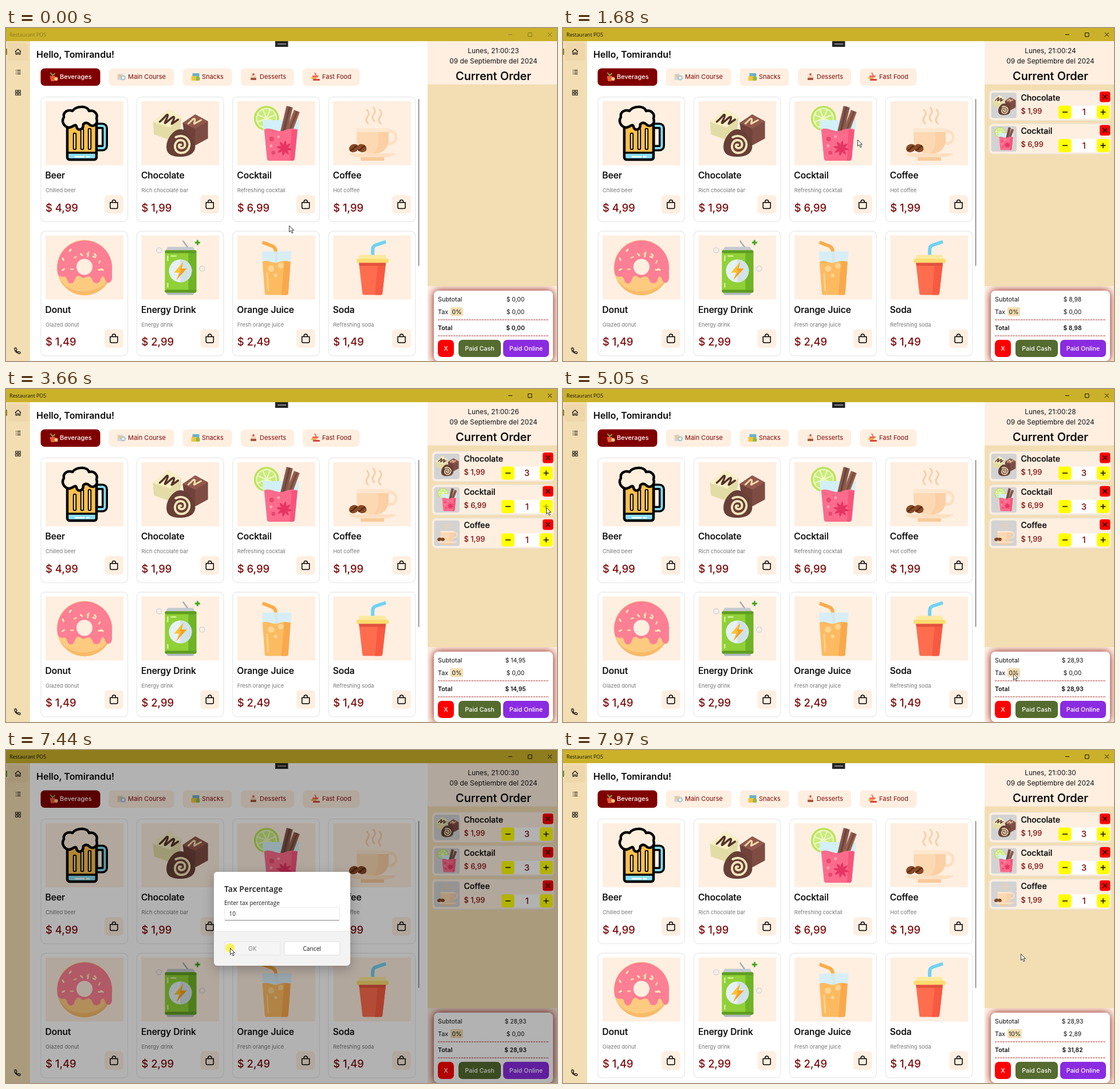
An HTML page for the animation above (8000 ms loop, 962 by 582 pixels).

```html
<!DOCTYPE html>
<html lang="en">
<head>
<meta charset="utf-8">
<title>Restaurant POS</title>
<style>
html, body { margin: 0; width: 100%; height: 100%; overflow: hidden; background: #fff; }
svg { display: block; width: 962px; height: 582px; }
text { font-family: Inter, Roboto, sans-serif; white-space: pre; }
.ui { font-family: "Open Sans", "Noto Sans", sans-serif; }
#dialog { filter: drop-shadow(0 6px 10px rgba(0,0,0,.24)); }
#bill { filter: drop-shadow(0 0 7px rgba(128,0,0,.95)); }
</style>
</head>
<body>
<script>
const CREAM = '#ffefe1', WHEAT = '#f3deb3', MAROON = '#7d0a0a', LOOP = 8000;

// Markup helpers
const rect = (x, y, w, h, fill, r = 0, more = '') =>
  `<rect x="${x}" y="${y}" width="${w}" height="${h}" rx="${r}" fill="${fill}" ${more}/>`;
const path = (d, fill = 'none', stroke = 'none', w = 1, more = '') =>
  `<path d="${d}" fill="${fill}" stroke="${stroke}" stroke-width="${w}" ${more}/>`;
const dot = (x, y, r, fill, stroke = 'none', w = 1, more = '') =>
  `<circle cx="${x}" cy="${y}" r="${r}" fill="${fill}" stroke="${stroke}" stroke-width="${w}" ${more}/>`;
const text = (s, x, y, size, weight = 400, fill = '#111', more = '') =>
  `<text x="${x}" y="${y}" font-size="${size}" font-weight="${weight}" fill="${fill}" ${more}>${s}</text>`;
const group = (x, y, body, scale = 1, more = '') =>
  `<g transform="translate(${x} ${y}) scale(${scale})" ${more}>${body}</g>`;
const MID = 'text-anchor="middle"', ROUND = 'stroke-linecap="round" stroke-linejoin="round"', UI = 'class="ui"';
const times = (n, f) => Array.from({ length: n }, (_, i) => f(i)).join('');
const money = c => `$ ${Math.floor(c / 100)},${String(c % 100).padStart(2, '0')}`;

// Pictures, each centred on 0,0 and about 98 units tall
const art = {
  Beer: () =>
    rect(18, -13, 17.5, 39, 'none', 4, 'stroke="#000" stroke-width="11"') +
    rect(18, -13, 17.5, 39, 'none', 4, 'stroke="#84dcf3" stroke-width="4"') +
    rect(-30, -26, 51, 72, '#fdc04d', 4) + rect(-28, 35, 47, 10, '#8be0f5') +
    rect(-30, -26, 51, 72, 'none', 4, 'stroke="#000" stroke-width="4.5"') +
    path('M-28 34H19', 'none', '#000', 3.5) +
    path('M-16 41H-1M4 41H8', 'none', '#fff', 2.5, ROUND) +
    times(3, i => path(`M${-17 + i * 13} ${i ? -6 : 2}V26`, 'none', '#000', 6.5, ROUND) +
      path(`M${-17 + i * 13} ${i ? -6 : 2}V26`, 'none', '#fde3a0', 2.5, ROUND)) +
    path('M-28-10C-36-12-41-21-36-28C-38-38-28-42-21-39C-15-48 5-49 8-39C17-41 24-34 21-26C25-16 14-9 8-16C4-20 0-18-2-16C-2-4-13-4-14-12C-16-18-20-10-28-10Z',
      '#ffefdc', '#000', 4.5, ROUND),

  Chocolate: () =>
    path('M-48-20L-20-42L2-28L0-6L-18 12L-46 2Z', '#e3dca6') +
    path('M-48-20L-20-42L2-28L-18-10Z', '#f7f0c4') +
    path('M4-18L26-33L48-21V9L26 21L8 10Z', '#70423a') +
    path('M26-8L48-21V9L26 21Z', '#7e4c43') + path('M4-18L26-33L48-21L26-8Z', '#93584c') +
    path('M-36-20C-26-28-24-34-22-32S-30-16-26-18S-12-32-11-28S-18-14-14-17L-4-24', 'none', '#54302a', 3.5, ROUND) +
    path('M14-17C20-22 23-27 25-25S22-15 25-17L36-23', 'none', '#f3dfa9', 3, ROUND) +
    path('M-24 20C-22 6-10-8 1-7C13-6 26 10 26 24C25 36 14 41 0 41C-16 41-26 36-24 20Z', '#673f36') +
    path('M1 20C-4 18-4 26 2 26C10 26 11 13 1 12C-11 11-14 31-1 34C14 36 20 20 13 11C8 4-2 3-8 7', 'none', '#f5e6bb', 4, ROUND),

  Cocktail: () =>
    dot(-17, -26, 22, '#b9e457') + dot(-17, -26, 18.5, '#eef8c8') +
    times(8, i => path('M0-3L5-15Q0-18-5-15Z', '#c8ec78', 'none', 1, `transform="translate(-17 -26) rotate(${i * 45})"`)) +
    path('M-24-23H40L33 48H-17Z', '#d2f0f7') +
    path('M18-48L29-45L17 4L6 2Z', '#87584c') + path('M22-47L25-46L13 3L10 3Z', '#6c4239') +
    path('M31-41L41-37L25 6L14 4Z', '#96604f') + path('M35-39L38-38L21 5L18 5Z', '#754a3e') +
    path('M-21-7C-8-12 2 0 14-5S32-8 37-7L32 45Q31 48 28 48H-12Q-15 48-16 45Z', '#fc6b8b') +
    path('M27-6H37L32 45Q31 48 28 48H24Z', '#f95379') +
    times(8, i => path('M0 0Q-5-6 0-14Q5-6 0 0', '#e63463', 'none', 1, `transform="translate(14 26) rotate(${i * 45 + 10})"`)) +
    dot(-8, 10, 4, '#e8476f') + dot(-5, 34, 3.5, '#e8476f') + dot(4, 6, 2.5, '#ffa4b6') + dot(-9, 22, 2.5, '#ffa4b6'),

  Coffee: () =>
    times(3, i => path(`M${-7 + i * 11} ${i == 1 ? -21 : -17}q-6-6-1-12t-1-12`, 'none', '#f8cfa8', 3, ROUND)) +
    dot(31, 7, 11, 'none', '#fde0c2', 5) +
    path('M-27-9H29V10C29 26 18 35 8 35H-6C-18 35-27 24-27 10Z', '#fcd9b3') +
    path('M10-9H29V10C29 26 18 35 8 35H2C12 28 12 12 10-9Z', '#fbd0a4') +
    path('M-27-9H29V-2H-27Z', '#fee7cf') +
    path('M-42 35H43C38 40 30 42 20 42H-20C-30 42-38 40-42 35Z', '#fde0c3') + rect(-20, 42, 41, 6, '#f7cb9a', 1) +
    [[-32, 26, -25], [-18, 26, 15]].map(([x, y, a]) =>
      group(x, y, `<ellipse rx="8.5" ry="7" fill="#8a4b26" transform="rotate(${a})"/>` +
        path('M-6 4Q-1 2 0 0T6-4', 'none', '#4c2612', 2))).join(''),

  Donut: () =>
    dot(0, 0, 48, '#fdcb80') + path('M-47 10A48 48 0 0 0 48 4C43 50-36 56-47 10Z', '#f8bb68') +
    path('M-47 9A48 48 0 1 1 48 6V20C46 29 38 29 36 21C34 13 29 15 28 22C26 30 15 29 14 22C10 13 4 16 0 18C-6 20-8 11-14 16C-18 20-17 28-24 28C-32 27-28 16-36 16C-42 17-46 15-47 9Z', '#fd7f93') +
    dot(0, -1, 14, CREAM) +
    times(20, i => {
      const a = i * 2.42 + 3, r = 22 + (i * 7) % 19, x = Math.cos(a) * r, y = Math.sin(a) * r;
      return y > 10 ? '' : path('M-2 0H2', 'none', i % 3 ? '#fff0bd' : '#fbd5a8', 2.6,
        `${ROUND} transform="translate(${x.toFixed(1)} ${y.toFixed(1)}) rotate(${i * 53})"`);
    }),

  'Energy Drink': () =>
    path('M5-46L13-35', 'none', '#a5acb4', 2.5, ROUND) +
    path('M-22-36H22L27-27H-27Z', '#c3cad0') + path('M-22 48H22L27 41H-27Z', '#aeb7bd') +
    rect(-27, -30, 55, 74, '#8fd136', 3) + rect(14, -30, 14, 74, '#6fb426', 3) +
    rect(-27, -30, 55, 5, '#5e9d22', 2) + rect(-27, 39, 55, 5, '#5e9d22', 2) +
    path('M-22-20V-12M-22 28V34M-16-20H-8', 'none', '#d5f39a', 2.5, ROUND) +
    dot(0, 6, 20, '#e6f1f5') + path('M0-14A20 20 0 0 1 0 26Z', '#d3e2e8') +
    path('M5-10L-11 9H-2L-7 22L11 2H2Z', '#fcc32f') + path('M5-10L-1 5H2L-7 22L11 2H2Z', '#f79f23') +
    path('M30-48V-39M25.5-43.5H34.5', 'none', '#41a51c', 2.8) +
    dot(-37, -30, 4.5, 'none', '#d8dcdf', 2) + dot(38, 2, 4.5, 'none', '#d8dcdf', 2),

  'Orange Juice': () =>
    path('M-24-44L-6-37Q-2-35-1-30L2-4', 'none', '#fbac48', 6, 'stroke-linejoin="round"') +
    path('M-25-28H27L21 45Q21 48 18 48H-17Q-20 48-20 45Z', '#d4effa', 'none', 1, 'opacity=".9"') +
    path('M-24-10C-14-15-6-5 4-9S20-11 25-10L21 45Q21 48 18 48H-17Q-20 48-20 45Z', '#fdbb61') +
    path('M14-11L25-10L21 45Q21 48 18 48H9Z', '#f9a94d') +
    dot(-9, 2, 5.5, '#ffd591') + dot(8, -3, 5, '#ffd591') + dot(-1, 14, 3, '#ffd591') +
    path('M-16 10L-14 40', 'none', '#ffd591', 2.5, ROUND),

  Soda: () =>
    path('M1-20V-31Q1-37 6-39L24-45', 'none', '#6fd2f3', 6, 'stroke-linejoin="round"') +
    path('M-23-8H24L18 45Q18 48 15 48H-14Q-17 48-17 45Z', '#ff6d4f') +
    path('M10-8H24L18 45Q18 48 15 48H5Z', '#f85a41') +
    path('M-22-22H23L26-12H-25Z', '#fdeaa0') + rect(-27, -15, 56, 7, '#fcdc6f', 2) + path('M-23-8H24L23-3H-22Z', '#e3513c')
};

const products = [
  ['Beer', 'Chilled beer', 499], ['Chocolate', 'Rich chocolate bar', 199],
  ['Cocktail', 'Refreshing cocktail', 699], ['Coffee', 'Hot coffee', 199],
  ['Donut', 'Glazed donut', 149], ['Energy Drink', 'Energy drink', 299],
  ['Orange Juice', 'Fresh orange juice', 249], ['Soda', 'Refreshing soda', 149]
];

const card = ([name, note, price], i) => group(61 + (i % 4) * 167.4, 120.5 + (i >> 2) * 234.5,
  rect(0, 0, 151.5, 218, '#fff', 8, 'stroke="#ebebeb" stroke-width="1.4"') +
  rect(8, 7.5, 136, 112, CREAM) + group(76, 63.5, art[name]()) +
  text(name, 7.5, 142.5, 15.6, 500, '#080808', 'stroke="#080808" stroke-width=".2"') +
  text(note, 8, 166.5, 9.3, 400, '#777') + text(money(price), 8, 200, 18.4, 500, MAROON) +
  rect(111, 171.5, 33, 32.5, CREAM, 6) +
  group(127.4, 188, path('M-6.5-3.5H6.5V5Q6.5 7 4.5 7H-4.5Q-6.5 7-6.5 5ZM-3-3.5V-5a3 3 0 0 1 6 0V-3.5', 'none', '#000', 1.5)));

const tabs = [
  ['Beverages', 60.5, 104, 94, ['#7fb04a', '#e85a3c', '#f3cf7a']],
  ['Main Course', 179.5, 114, 213, ['#d9d4cf', '#f0c773', '#9ec3d8']],
  ['Snacks', 308.5, 86, 342, ['#6ab0c9', '#f0c63d', '#94b84a']],
  ['Desserts', 410, 93, 443, ['#e0594c', '#f5d5b8', '#a8553c']],
  ['Fast Food', 518, 99.5, 552, ['#f06a5a', '#f2b04c', '#d8433c']]
];
const tabIcon = ([a, b, c], i) => [
  path('M2 0L6 5L10 1', 'none', a, 2) + path('M1 6H11L9 15H3Z', b) + rect(9, 8, 6, 6, c, 2),
  rect(0, 2, 9, 11, a, 1) + dot(10, 9, 4.5, c) + dot(10, 9, 2.5, '#f7f2e6') + rect(2, 4, 4, 4, b, 1),
  rect(2, 1, 12, 6, a, 1) + rect(0, 6, 10, 8, b, 1) + rect(8, 7, 7, 7, c, 2),
  dot(7, 3, 2, a) + rect(2, 5, 10, 4, b, 1) + rect(2, 9, 10, 4, c, 1),
  path('M6 0L9 6', 'none', a, 2) + path('M2 5H13Q12 9 8 9H2Z', a) + rect(0, 8, 9, 3, b, 1) + rect(3, 11, 12, 3, c, 1)
][i];
const tab = ([name, x, w, tx, colors], i) =>
  rect(x, 70.5, w, 30.5, i ? CREAM : '#800000', 7) + group(x + 15, 78, tabIcon(colors, i)) +
  text(name, tx, 89.2, 11, i ? 400 : 500, i ? MAROON : '#fff');

// Order lines: product and its quantity steps
const order = [
  { item: products[1], qty: [[930, 1], [3060, 2], [3300, 3]] },
  { item: products[2], qty: [[1490, 1], [3860, 2], [4090, 3]] },
  { item: products[3], qty: [[2310, 1]] }
];
const orderLine = ({ item: [name, , price] }, i) => group(744, 109 + i * 58.4,
  rect(0, 0, 213, 52.5, CREAM, 7, 'stroke="#e9e4dd" stroke-width="1.2"') +
  rect(3.5, 4, 44.5, 44.5, '#d3d3d3', 4) + group(26, 26, art[name](), .42) +
  text(name, 55.5, 17.5, 14.1, 500, '#080808', 'stroke="#080808" stroke-width=".2"') +
  text(money(price), 55.5, 41, 12.8, 500, MAROON) +
  rect(193, 2, 18.5, 18.5, '#fe0000', 4) + path('M198.5 7.5L206 15M206 7.5L198.5 15', 'none', '#111', 1.5) +
  rect(137, 26.5, 57, 23, '#fff') + rect(121, 26.5, 22.5, 23, '#ff0', 4) + rect(188, 26.5, 22.5, 23, '#ff0', 4) +
  path('M128 38H137', 'none', '#111', 1.6) +
  path('M194.5 38H203.5M199 33.5V42.5', 'none', '#111', 1.6, `id="plus${i}"`) +
  text('', 165.5, 43.2, 15, 500, MAROON, `${MID} id="qty${i}"`), 1, `id="line${i}"`);

const button = (x, w, fill, label) =>
  rect(x, 545, w, 30, fill, 7) + text(label, x + w / 2, 563.5, 10.8, 500, '#fff', MID);
const dash = y => path(`M754 ${y}H948`, 'none', '#a8322c', 1, 'stroke-dasharray="3.5 1"');

const scene =
  rect(0, 0, 962, 582, '#fff') + rect(0, 23, 42, 559, WHEAT) +
  rect(3, 26, 36, 31, '#eed7aa', 4) + rect(0, 36, 2, 11, '#8f7a1d', 1, 'id="mark"') +
  group(21, 41.5, path('M-5-.3L0-4.6L5-.3M-3.8-1V4.4H-1.2V1.5H1.2V4.4H3.8V-1', 'none', '#111', 1.2)) +
  group(21, 77, path('M-4-3.2h1.2M-1.5-3.2H4.5M-4 0h1.2M-1.5 0H4.5M-4 3.2h1.2M-1.5 3.2H4.5', 'none', '#111', 1.2)) +
  group(21, 113, times(4, i => rect(i % 2 ? .8 : -4.3, i > 1 ? .8 : -4.3, 3.5, 3.5, 'none', .3, 'stroke="#111" stroke-width="1.1"'))) +
  group(19.5, 564, path('M-4.5-4.5L-2-5L-.5-2L-2-.5Q-.8 2 1.2 2.7L2.7 1.3L5.5 2.8L5 5Q3 6-1 3T-4.5-4.5Z', 'none', '#111', 1.3, ROUND)) +
  text('Hello, Tomirandu!', 53, 51.5, 16, 600, '#080808') + tabs.map(tab).join('') + products.map(card).join('') +
  rect(719.8, 124, 1.6, 292, '#808080', .8) +
  rect(736, 23, 226, 76, CREAM) + rect(736, 98.5, 226, 353, WHEAT) + rect(736, 451, 226, 131, CREAM) +
  text('', 851, 43.5, 11.9, 400, '#111', `${MID} id="clock"`) +
  text('09 de Septiembre del 2024', 851, 61.5, 11.9, 400, '#111', MID) +
  text('Current Order', 851, 90.5, 19.9, 500, '#080808', `${MID} stroke="#080808" stroke-width=".2"`) +
  order.map(orderLine).join('') +
  `<svg x="736" y="451" width="226" height="131" viewBox="736 451 226 131">${rect(747, 459, 208, 123, '#fff', 8, 'id="bill"')}</svg>` +
  text('Subtotal', 754, 477.5, 10.9) + text('Tax', 754, 499.5, 10.9) +
  rect(776, 488, 22, 15.5, WHEAT, 2, 'id="rateBox"') +
  text('', 787, 499.5, 10.5, 400, '#111', `${MID} id="rate"`) +
  text('Total', 754, 527.5, 10.7, 600) +
  [['subtotal', 477.5, 400], ['tax', 499.5, 400], ['total', 527.5, 600]].map(([id, y, w]) =>
    text('', 889.5, y, 10.3, w, '#111', `${MID} id="${id}"`)).join('') +
  dash(510) + dash(538) + button(754, 28, '#fe0000', 'X') + button(790, 74, '#556b2f', 'Paid Cash') + button(868, 80, '#8a2be2', 'Paid Online') +
  rect(470, 23, 22.5, 10, '#252525') + rect(474, 27, 15, 2, '#858585') +
  rect(0, 0, 962, 23, '#cbb129') +
  `<g id="caption">${text('Restaurant POS', 6, 15, 8.8, 400, '#111', UI)}${path('M877 11.5H884M911.5 8.5H918V15H911.5ZM946 8L953 15M953 8L946 15', 'none', '#111', 1)}</g>`;

const dialogButton = (x, label, id) =>
  rect(x, 335, 97.5, 23.5, '#fff', 3, `stroke="#dcdcdc" id="${id}Box"`) +
  text(label, x + 48.7, 350.5, 10.2, 400, '#111', `${MID} ${UI} id="${id}"`);
const dialog =
  rect(0, 0, 962, 582, '#000', 0, 'id="smoke" fill-opacity=".3"') +
  `<g id="dialog">${rect(363, 213, 238, 164, '#f3f3f3', 6)}` +
  path('M363 317V219Q363 213 369 213H595Q601 213 601 219V317Z', '#fff') + path('M363 317H601', 'none', '#e3e3e3') +
  text('Tax Percentage', 381, 247.5, 14, 600, '#1b1b1b', UI) + text('Enter tax percentage', 381, 271.3, 10, 400, '#1b1b1b', UI) +
  rect(381.5, 275, 201, 23, '#fff', 3, 'stroke="#e8e8e8"') + path('M382 297.5H582', 'none', '#8f8212', 1.6, 'id="under"') +
  text('0', 389.5, 290, 10, 400, '#1b1b1b', `${UI} id="field"`) +
  `<g id="focus">${path('M565.5 282L574 290.5M574 282L565.5 290.5', 'none', '#777')}${path('M389.5 280V292', 'none', '#111', 1, 'id="caret"')}</g>` +
  dialogButton(381.5, 'OK', 'ok') + dialogButton(485.5, 'Cancel', 'cancel') + '</g>';

const pointer = dot(0, 0, 8, '#fbf23c', 'none', 1, 'id="halo" opacity=".85"') +
  path('M.5.5V11.5L3.1 9.1L5.2 13.7L7.1 12.8L5.1 8.4H8.4Z', '#fff', '#222', .9);

document.body.innerHTML = `<svg viewBox="0 0 962 582">${scene}${dialog}<g id="pointer">${pointer}</g></svg>`;

// Timeline
const $ = Object.fromEntries([...document.querySelectorAll('[id]')].map(e => [e.id, e]));
const set = (id, name, v) => $[id].setAttribute(name, v);
const show = (id, on) => set(id, 'visibility', on ? 'inherit' : 'hidden');
const within = (t, a, b) => t >= a && t < b;
const stepAt = (steps, t) => steps.reduce((v, [at, next]) => t >= at ? next : v, 0);

const moves = [
  [0, 494, 345], [580, 494, 345], [850, 310, 205], [960, 310, 205], [1340, 454, 192], [1490, 456, 192],
  [1680, 514, 195], [1750, 514, 195], [2110, 642, 192], [2310, 644, 192], [2650, 926, 155], [2840, 926, 155],
  [2850, 936, 147], [3320, 938, 148], [3600, 943, 207], [4110, 943, 207], [4630, 802, 515], [4700, 800, 512],
  [5040, 786, 497], [5175, 786, 497], [5180, 750, 477], [5250, 750, 477], [5460, 349, 368],
  [6590, 349, 368], [7150, 391, 346], [7510, 391, 346], [7965, 799, 356], [8000, 799, 356]
];
const presses = [[860, 930], [1420, 1490], [2240, 2310], [7370, 7510]];
const plusPresses = [[[2990, 3060], [3230, 3300]], [[3660, 3860], [4020, 4090]], []];
const ticks = [1030, 2040, 3060, 4040, 5040, 6060, 7080];
const OPEN = 5180, TYPED = 6260, ACCEPT = 7370, CLOSE = 7510;

function pointerAt(t) {
  const i = moves.findIndex(m => m[0] > t);
  const [a, x, y] = moves[i - 1], [b, u, v] = moves[i];
  const k = (t - a) / (b - a);
  return `translate(${(x + (u - x) * k).toFixed(1)} ${(y + (v - y) * k).toFixed(1)})`;
}

function draw(t) {
  set('pointer', 'transform', pointerAt(t));
  show('halo', presses.some(([a, b]) => within(t, a, b)));
  $.clock.textContent = `Lunes, 21:00:${23 + ticks.filter(s => t >= s).length}`;
  set('caption', 'opacity', t < 930 ? .35 : 1);
  set('mark', 'fill', t < OPEN ? '#8f7a1d' : '#4f9418');

  let sum = 0;
  order.forEach(({ item, qty }, i) => {
    const n = stepAt(qty, t);
    sum += n * item[2];
    show('line' + i, n > 0);
    $['qty' + i].textContent = n;
    set('plus' + i, 'opacity', plusPresses[i].some(([a, b]) => within(t, a, b)) ? .35 : 1);
  });
  const rate = t >= CLOSE + 70 ? 10 : 0, tax = Math.floor(sum * rate / 100);
  $.rate.textContent = rate + '%';
  set('rate', 'x', rate ? 788.5 : 787);
  set('rateBox', 'width', rate ? 25 : 22);
  $.subtotal.textContent = money(sum);
  $.tax.textContent = money(tax);
  $.total.textContent = money(sum + tax);

  const fade = t < OPEN ? 0 : Math.max(0, Math.min(1, 1 - (t - CLOSE) / 170));
  set('smoke', 'opacity', fade);
  set('dialog', 'opacity', fade);
  $.field.textContent = t < TYPED ? '0' : '10';
  set('caret', 'transform', `translate(${t < TYPED ? 0 : 5.7} 0)`);
  const done = t >= ACCEPT;
  show('focus', !done);
  set('under', 'stroke', done ? '#8a8a8a' : '#8f8212');
  set('under', 'stroke-width', done ? 1 : 1.6);
  set('ok', 'fill', done ? '#777' : '#111');
  set('okBox', 'fill', done ? '#f5f5f5' : '#fff');
  set('okBox', 'stroke', done ? '#e6e6e6' : '#dcdcdc');
}

const start = performance.now();
function frame() {
  draw((performance.now() - start) % LOOP);
  requestAnimationFrame(frame);
}
frame();
</script>
</body>
</html>
```
